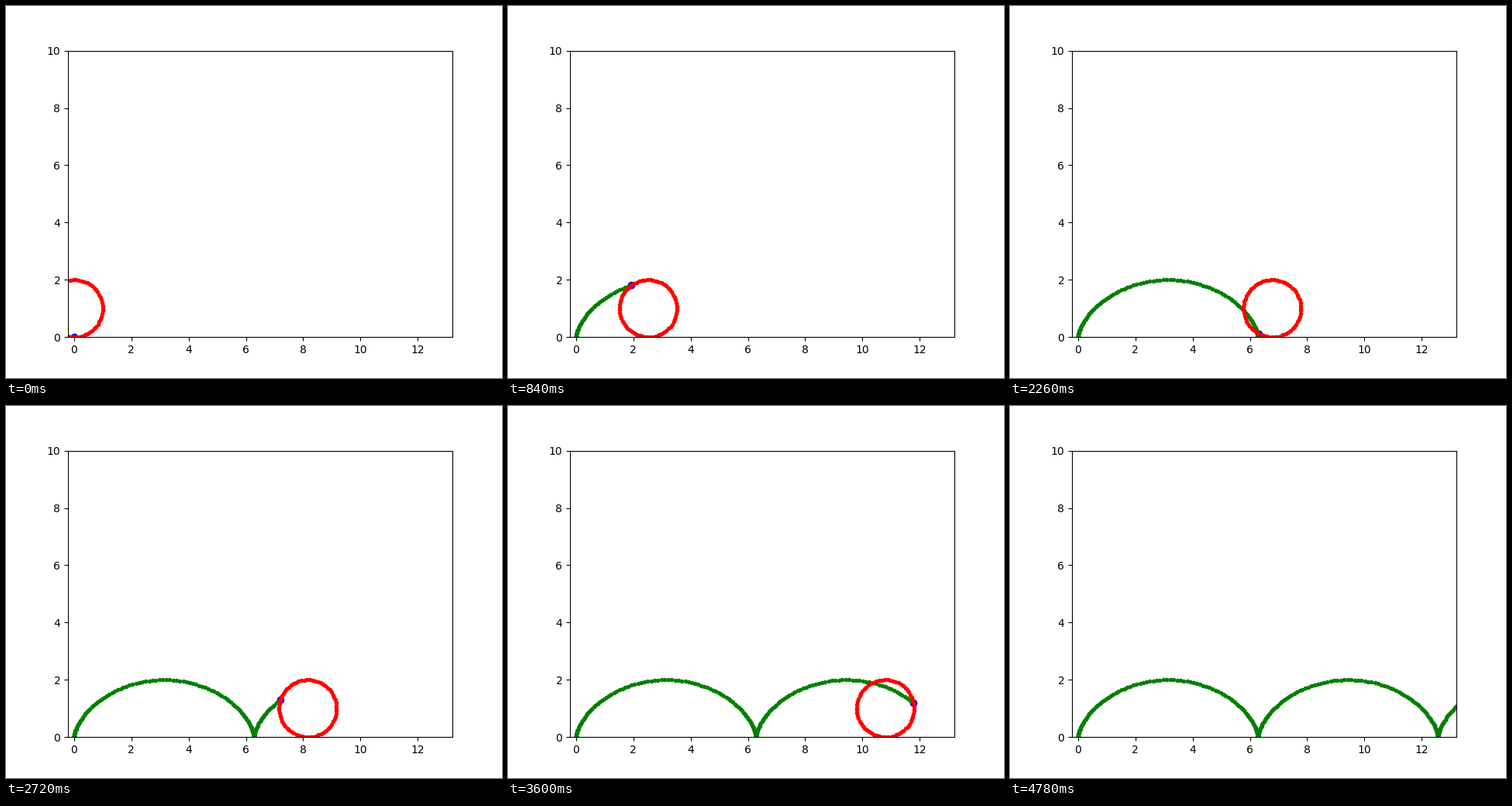
These frames come from a looping animation (640x480 px, 5210 ms). A matplotlib script:

```python
import numpy as np
import matplotlib.pyplot as plt
from matplotlib.animation import FuncAnimation

LOOP_MS = 5210
TICK_MS = 10
STEP_TICKS = 2      # the wheel advances every 20 ms
TURN = 0.06         # radians rolled per step
RADIUS = 1.0

fig = plt.figure(figsize=(6.4, 4.8), dpi=100)
ax = fig.add_axes([0.125, 0.11, 0.775, 0.77])

# Equal scale on both axes, centred on x = 6.5
half_width = 5 * (0.775 * 640) / (0.77 * 480)
ax.set_xlim(6.5 - half_width, 6.5 + half_width)
ax.set_ylim(0, 10)
ax.set_xticks(range(0, 13, 2))

point, = ax.plot([], [], "bo")
trail, = ax.plot([], [], "g.")
wheel, = ax.plot([], [], "r.")

rim = np.arange(0, 2 * np.pi, 0.1)
rim_x = RADIUS * np.cos(rim)
rim_y = RADIUS * (1 + np.sin(rim))


def cycloid(t):
    return RADIUS * (t - np.sin(t)), RADIUS * (1 - np.cos(t))


def update(tick):
    t = TURN * np.arange(tick // STEP_TICKS + 1)
    x, y = cycloid(t)
    trail.set_data(x, y)
    point.set_data(x[-1:], y[-1:])
    wheel.set_data(rim_x + RADIUS * t[-1], rim_y)
    return point, trail, wheel


anim = FuncAnimation(fig, update, frames=LOOP_MS // TICK_MS,
                     init_func=lambda: update(0), interval=TICK_MS,
                     repeat=True, repeat_delay=0)
plt.show()
```
